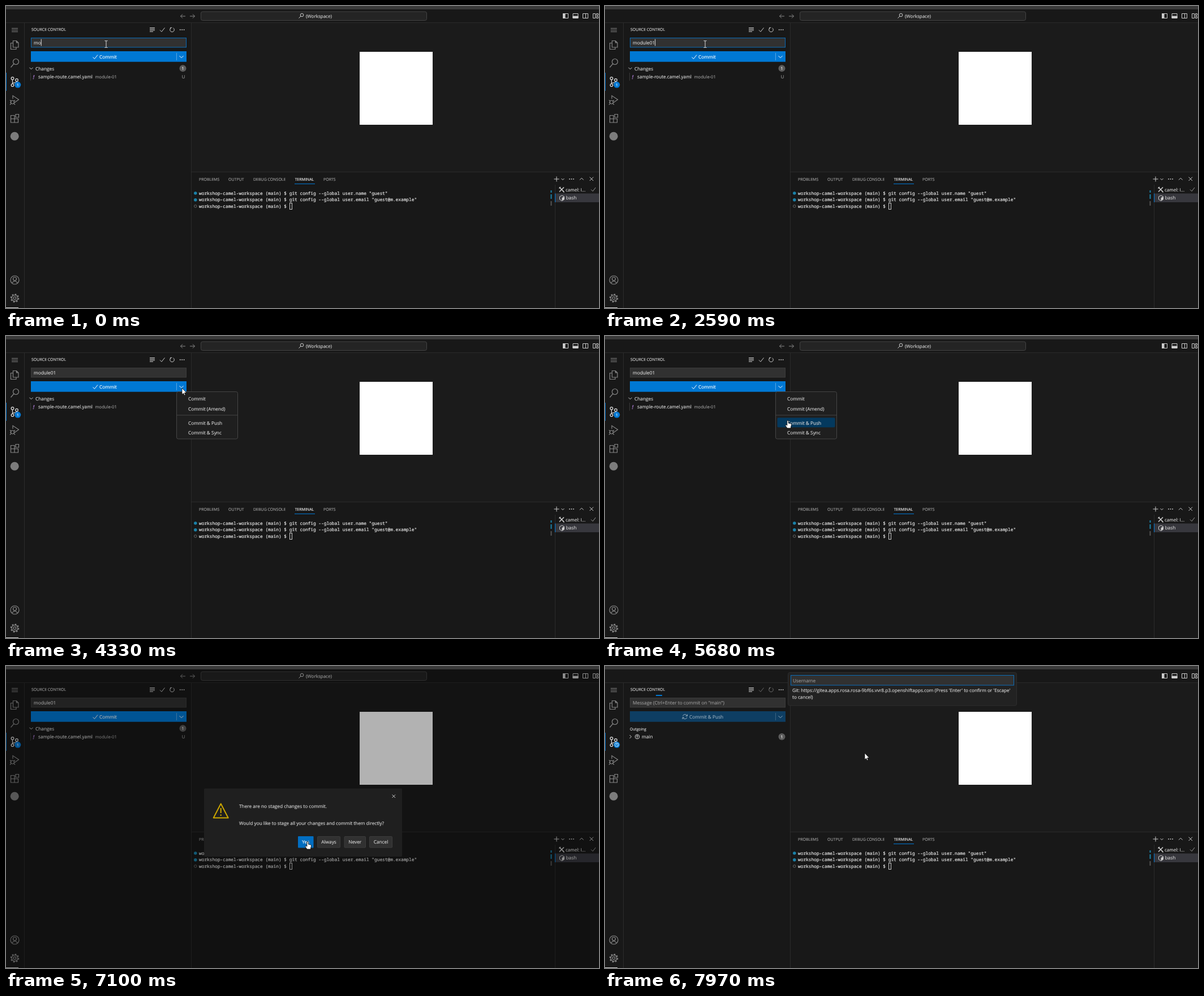
These frames come from a looping animation (1048 px wide and 534 px high, 8 s). An HTML page:

```html
<!DOCTYPE html>
<html lang="en">
<head>
<meta charset="utf-8">
<title>Commit and push</title>
<style>
  html, body { margin: 0; width: 100%; height: 100%; overflow: hidden; background: #181818; }
  svg { display: block; width: 100vw; height: 100vh; }
  text {
    font: 8.3px "Open Sans", "Noto Sans", sans-serif; white-space: pre; text-rendering: geometricPrecision;
    color: #d4d4d4; fill: currentColor; stroke: currentColor; stroke-width: .15;
  }
  .term text { font: 7.84px "Noto Sans Mono", "DejaVu Sans Mono", monospace; color: #dedede; stroke-width: .22; }
  .tabs text { font-size: 7px; color: #9d9d9d; }
  .icon { fill: none; stroke: #ccc; stroke-width: 1; }
  .activity { fill: none; stroke: #868686; stroke-width: 1.2; }
  .rule { stroke: #2b2b2b; }
  .middle { text-anchor: middle; }
  .white { color: #fff; }
  .grey { color: #949494; }
  .blue { fill: #0078d4; }
  .box { fill: #313131; stroke: #3c3c3c; }
  .badge { font-size: 7.2px; text-anchor: middle; color: #f8f8f8; }
</style>
</head>
<body>
<svg viewBox="0 0 1048 534">
  <!-- window areas -->
  <rect width="1048" height="534" fill="#181818"/>
  <rect x="328" y="30" width="720" height="263" fill="#1b1b1b"/>
  <rect width="1048" height="6" fill="#3a3a3a"/>
  <path class="rule" d="M0 29.5H1048M32.5 30V534M327.5 30V534M328 293.5H1048M970.5 316V534"/>
  <rect y="533" width="22" height="1" fill="#ddd"/>

  <!-- title bar -->
  <g id="commandCenter">
    <path class="icon" style="stroke:#8a8a8a" d="M317 18H308.500M312 14.500L308.500 18L312 21.500M325 18H333.500M330 14.500L333.500 18L330 21.500"/>
    <rect x="344.500" y="10" width="399" height="15.500" rx="3" fill="#242424" stroke="#434343"/>
    <g class="icon"><circle cx="523" cy="16" r="2.800"/><path d="M521 18L517.500 21.500"/></g>
    <text x="530" y="20.600" style="font-size:8px">(Workspace)</text>
  </g>
  <g class="icon">
    <path d="M984.500 13.500h9v8h-9zM1002 13.500h9v8h-9zM1019.500 13.500h9v8h-9zM1024.500 13.500v8M1037.500 13.500h4v8h-4zM1043.500 13.500h3v3h-3zM1043.500 18.500h3v3h-3z"/>
    <path fill="#ccc" d="M984.500 13.500h3.500v8h-3.500zM1002 18h9v3.500h-9z"/>
  </g>

  <!-- activity bar -->
  <rect class="blue" y="118" width="1" height="32"/>
  <g class="activity">
    <path d="M10 39.500H21M10 42.500H21M10 45.500H21" stroke-width="1"/>
    <path d="M12.500 61.500H18.500L22 65V73H12.500ZM18.500 61.500V65H22M12.500 65.500H8.500V76.500H18V73"/>
    <circle cx="17.500" cy="98.500" r="5"/><path d="M14 102L8.500 108.500"/>
    <g stroke="#e0e0e0"><circle cx="11.500" cy="128" r="2.300"/><circle cx="11.500" cy="140" r="2.300"/><circle cx="19" cy="131" r="2.300"/><path d="M11.500 130.300V137.700M19 133.300Q18.500 136 12 136"/></g>
    <path d="M12 164V158.500L22.500 165.500L16 170"/><circle cx="11.500" cy="170" r="3"/><path d="M7 166.500L9 168M16 166.500L14 168M7 170.500H8.500M14.500 170.500H16.500M7 174.500L9 172.500M16 174.500L14 172.500"/>
    <path d="M8.500 193.500H15V206H8.500ZM8.500 199.500H21.500V206H15M17 191.500H22.500V197H17Z"/>
    <circle cx="15.500" cy="484.500" r="7.500"/><circle cx="15.500" cy="482.500" r="3"/><path d="M10.500 490Q15.500 483 20.500 490"/>
    <circle cx="15.500" cy="516.500" r="2.300"/><circle cx="15.500" cy="516.500" r="5.300"/><circle cx="15.500" cy="516.500" r="6.800" stroke-width="2" stroke-dasharray="2.670 2.670"/>
  </g>
  <circle cx="15.200" cy="230.300" r="7.500" fill="#7c7c7c"/>
  <circle class="blue" cx="20.800" cy="139.300" r="5.500"/>
  <text id="scmCount" class="badge" x="20.800" y="142" style="font-size:6.500px">1</text>
  <g id="scmClock" fill="none" stroke="#fff" stroke-width=".8"><circle cx="20.800" cy="139.300" r="3.300"/><path d="M20.800 137V139.500L22.300 140.500"/></g>

  <!-- source control -->
  <text x="45" y="44.400" style="font-size:7px">SOURCE CONTROL</text>
  <path class="icon" d="M254 38.500H263M254 40.800H263M254 43H263M254 45.300H260"/>
  <g id="headerActions" class="icon"><path d="M272 42.500L275 45.500L280.500 38.500M291.500 38.800A3.800 3.800 0 1 0 295.500 38.800M290.500 41V38.300H293.300"/></g>
  <g fill="#ccc"><circle cx="307.800" cy="42" r=".9"/><circle cx="311.200" cy="42" r=".9"/><circle cx="314.600" cy="42" r=".9"/></g>
  <rect id="progress" class="blue" y="51" width="11" height="2"/>
  <rect id="message" class="box" x="44.500" y="56.500" width="274" height="16.500"/>
  <text id="messageText" x="49" y="67.700"></text>
  <rect id="caret" y="58.500" width="1" height="12" fill="#ddd"/>

  <rect id="commitButton" x="44" y="80" width="275" height="18.700"/>
  <g id="commitLabel">
    <path d="M301.500 83V96" stroke="#fff" stroke-opacity=".35"/>
    <path class="icon" style="stroke:#fff" d="M306.500 88.200L310 91.700L313.500 88.200"/>
    <g id="commitPlain"><path class="icon" style="stroke:#fff" d="M153.500 90.500L156.500 93.500L162 86.500"/><text class="white" x="165" y="92.700">Commit</text></g>
    <g id="commitPush"><path class="icon" style="stroke:#fff" d="M137.500 88.500A4 4 0 0 1 145 88M145.500 85.500V88.500H142.500M145 91A4 4 0 0 1 137.500 91M137 94V91H140"/><text class="white" x="149" y="92.700">Commit &amp; Push</text></g>
  </g>

  <g id="changes">
    <path class="icon" d="M41.500 108.800L44.500 111.800L47.500 108.800"/>
    <path d="M43.500 118V132" stroke="#383838"/>
    <text x="52" y="113.700">Changes</text>
    <circle cx="312.500" cy="110.300" r="6" fill="#5c5c5c"/><text class="badge" x="312.500" y="113">1</text>
    <text x="47.500" y="128.700" style="font-weight:bold;font-style:italic;font-size:9.500px;color:#a074c4">!</text>
    <text x="57" y="128.200" style="font-size:8.150px">sample-route.camel.yaml</text>
    <text class="grey" x="157.500" y="128.200" style="font-size:7.600px">module-01</text>
    <text class="grey middle" x="313.500" y="128.200" style="font-size:7.800px">U</text>
  </g>
  <g id="outgoing">
    <text x="44" y="113.500" style="font-size:6.700px">Outgoing</text>
    <path class="icon" d="M43.500 122L46.500 125L43.500 128"/>
    <g class="icon"><circle cx="57" cy="125" r="3.800"/><path d="M57 127.300V122.800M55 124.700L57 122.700L59 124.700"/></g>
    <text x="65" y="128.200">main</text>
    <circle cx="312.500" cy="125" r="6" fill="#5c5c5c"/><text class="badge" x="312.500" y="127.700">1</text>
  </g>

  <!-- editor emblem -->
  <rect x="625" y="81" width="129" height="129" fill="#fff"/>

  <!-- panel -->
  <g class="tabs">
    <text x="341" y="308.800">PROBLEMS</text><text x="393" y="308.800">OUTPUT</text><text x="437" y="308.800">DEBUG CONSOLE</text>
    <text x="510.500" y="308.800" style="color:#eee">TERMINAL</text><text x="561" y="308.800">PORTS</text>
  </g>
  <rect class="blue" x="510" y="314" width="36" height="1"/>
  <path class="icon" d="M968.500 306H977.500M973 301.500V310.500M981.500 305L984 307.500L986.500 305M1014 307.500L1017.300 304.200L1020.600 307.500M1031.500 302.500L1038 309M1038 302.500L1031.500 309"/>
  <g fill="#ccc"><circle cx="996" cy="306" r=".9"/><circle cx="999.500" cy="306" r=".9"/><circle cx="1003" cy="306" r=".9"/></g>
  <g class="term">
    <circle cx="334.800" cy="331" r="2.800" fill="#1b81a8"/><circle cx="334.800" cy="342.700" r="2.800" fill="#1b81a8"/>
    <circle cx="334.800" cy="354" r="2.300" fill="none" stroke="#686868"/>
    <text x="341" y="333.800">workshop-camel-workspace (main) $ git config --global user.name "guest"</text>
    <text x="341" y="345.400">workshop-camel-workspace (main) $ git config --global user.email "guest@m.example"</text>
    <text x="341" y="357">workshop-camel-workspace (main) $ </text>
    <rect x="501.500" y="348.500" width="4" height="11" fill="none" stroke="#ccc"/>
  </g>
  <path d="M963.500 326V330M963.500 333V341" stroke="#1b81a8" stroke-width="2"/>
  <path d="M963.500 345V353" stroke="#555" stroke-width="2"/>
  <rect x="971" y="331.500" width="77" height="15.500" fill="#37373d"/>
  <rect class="blue" x="970" y="331.500" width="1" height="15.500"/>
  <path class="icon" style="stroke-width:1.600" d="M978 320.500L986 328.500M986 320.500L978 328.500M977.500 322.500L980 320M984 327L986.500 329.500"/>
  <text x="989" y="327.600" style="font-size:8px">camel: I...</text>
  <path class="icon" d="M1034 324.500L1037 327.500L1042 321" stroke-opacity=".7"/>
  <path class="icon" d="M978.500 337L982.500 335L986.500 337V342L982.500 344.500L978.500 342Z"/><path d="M982.500 339L986.500 337V342L982.500 344.500Z" fill="#ccc"/>
  <text x="989.500" y="342.400">bash</text>

  <!-- commit menu -->
  <g id="menu">
    <rect x="301.500" y="98.500" width="108" height="83.500" rx="3" fill="#1f1f1f" stroke="#454545"/>
    <path d="M302 140H409" stroke="#454545"/>
    <rect id="menuHover" x="304.500" width="102" height="17" rx="2" fill="#04395e"/>
    <text x="322" y="114">Commit</text><text x="322" y="131.600">Commit (Amend)</text>
    <text x="322" y="156.500">Commit &amp; Push</text><text x="322" y="174">Commit &amp; Sync</text>
  </g>

  <!-- confirmation -->
  <g id="dialog">
    <rect y="6" width="1048" height="528" fill="#000" fill-opacity=".3"/>
    <rect x="350" y="216.500" width="350" height="120.500" rx="2" fill="#1f1f1f"/>
    <path class="icon" d="M682.500 227.500L688 233M688 227.500L682.500 233"/>
    <path d="M379.700 243.500L392.700 268.500H366.700ZM379.700 251V260M379.700 262.500V265" fill="none" stroke="#cca700" stroke-width="2" stroke-linejoin="round"/>
    <text x="412" y="250.800">There are no staged changes to commit.</text>
    <text x="412" y="280.500" style="font-size:8.200px">Would you like to stage all your changes and commit them directly?</text>
    <rect id="yes" x="516" y="301" width="27.500" height="20.500" rx="1"/>
    <rect id="always" class="box" x="550.500" y="301.500" width="40" height="19.500" rx="1"/>
    <rect class="box" x="598" y="301.500" width="37.500" height="19.500" rx="1"/>
    <rect class="box" x="642.500" y="301.500" width="40" height="19.500" rx="1"/>
    <g class="middle"><text class="white" x="529.700" y="314">Yes</text><text x="570.500" y="314">Always</text><text x="616.800" y="314">Never</text><text x="662.500" y="314">Cancel</text></g>
  </g>

  <!-- credentials prompt -->
  <g id="prompt">
    <rect x="323.500" y="11.500" width="404" height="58.500" rx="3" fill="#222" stroke="#2e2e2e"/>
    <rect x="328.500" y="16.500" width="394" height="17.500" fill="#313131" stroke="#0a6cb8"/>
    <text class="grey" x="332" y="28.500">Username</text>
    <text x="331" y="46.400" style="font-size:8.200px">Git: https://gitea.apps.rosa.rosa-9bf6s.vvr8.p3.openshiftapps.com (Press 'Enter' to confirm or 'Escape'</text>
    <text x="331" y="58.400" style="font-size:8.200px">to cancel)</text>
  </g>

  <!-- pointer: origin is the hot spot -->
  <g id="pointer">
    <path id="ibeam" d="M-2.500 -5.500H-.7L0 -5L.7 -5.500H2.500M0 -5V6M-2.500 6.500H-.7L0 6L.7 6.500H2.500" fill="none" stroke="#ddd"/>
    <path id="arrow" d="M0 0V11.500L2.600 9.200L4.300 13L6 12.200L4.400 8.600H8Z" fill="#fff" stroke="#000" stroke-width=".7"/>
    <path id="hand" d="M-1.200 1Q0 -.8 1.200 1V5L5.200 6Q6.700 6.500 6.500 8L5.600 12V14H-1L-4 9.500Q-4.300 7.700 -2.600 8L-1.200 9.200Z" fill="#fff" stroke="#000" stroke-width=".8"/>
  </g>
</svg>
<script>
const LOOP = 8000;
const byId = id => document.getElementById(id);
const show = (id, on) => { byId(id).style.display = on ? '' : 'none'; };
const within = (t, from, to) => t >= from && t < to;

const typed = [[0, 2], [740, 3], [1040, 4], [1320, 6], [2310, 7], [2590, 8]];
const caretOff = [[120, 620], [1880, 2310], [3120, 3660]];

// first step, last step, number of steps, destination
const START = [177, 67];
const moves = [
  [3400, 3790, 4, 295, 93],
  [3910, 4040, 2, 311, 92],
  [4980, 5400, 4, 323, 149],
  [6200, 6840, 6, 562, 312],
  [6970, 7100, 2, 533, 310],
  [7390, 7820, 4, 459, 154],
];

function pointerAt(t) {
  let [x, y] = START;
  for (const [from, to, steps, toX, toY] of moves) {
    if (t < from) break;
    const step = Math.floor((t - from) / (to - from) * (steps - 1) + 1e-6) + 1;
    const part = Math.min(1, step / steps);
    x += (toX - x) * part;
    y += (toY - y) * part;
  }
  return [x, y];
}

function draw(t) {
  const [x, y] = pointerAt(t);
  const menuOpen = within(t, 4190, 5930);
  const dialogOpen = within(t, 5930, 7250);
  const busy = t >= 7250;
  const committed = t >= 7680;
  const prompting = t >= 7820;
  const focused = t < 4190;

  const message = byId('messageText');
  const count = typed.filter(([at]) => t >= at).pop()[1];
  message.textContent = committed ? 'Message (Ctrl+Enter to commit on "main")' : 'module01'.slice(0, count);
  message.style.color = committed ? '#989898' : '';
  byId('message').style.stroke = focused ? '#0a6cb8' : '';
  show('caret', focused && !caretOff.some(([from, to]) => within(t, from, to)));
  if (focused) byId('caret').setAttribute('x', 49 + message.getComputedTextLength());

  const onButton = focused && y > 80;
  byId('commitButton').style.fill = busy ? '#0e3e63' : onButton && x < 302 ? '#026ec1' : '#0078d4';
  byId('commitLabel').style.opacity = busy ? 0.55 : 1;
  byId('headerActions').style.opacity = busy ? 0.45 : 1;
  show('commitPlain', !committed);
  show('commitPush', committed);
  show('changes', !committed);
  show('outgoing', committed);
  show('scmCount', !busy);
  show('scmClock', busy);
  show('progress', busy);
  byId('progress').setAttribute('x', 33 + (t - 7250) * 0.079);

  show('menu', menuOpen);
  const row = [102.5, 120, 144.5].findLast(top => y >= top);
  show('menuHover', row !== undefined);
  byId('menuHover').setAttribute('y', row ?? 0);

  show('dialog', dialogOpen);
  const onDialogButtons = dialogOpen && y > 301;
  const onYes = onDialogButtons && within(x, 516, 544);
  const onAlways = onDialogButtons && within(x, 550, 591);
  byId('yes').style.fill = onYes ? '#026ec1' : '#0078d4';
  byId('always').style.fill = onAlways ? '#3c3c3c' : '';

  show('prompt', prompting);
  show('commandCenter', !prompting);

  const hand = onButton || menuOpen && row !== undefined || onYes || onAlways;
  const ibeam = focused && y <= 80;
  show('hand', hand);
  show('ibeam', ibeam);
  show('arrow', !hand && !ibeam);
  byId('pointer').setAttribute('transform', `translate(${x} ${y})`);
}

const began = performance.now();
function tick() {
  draw((performance.now() - began) % LOOP);
  requestAnimationFrame(tick);
}
tick();
</script>
</body>
</html>
```
